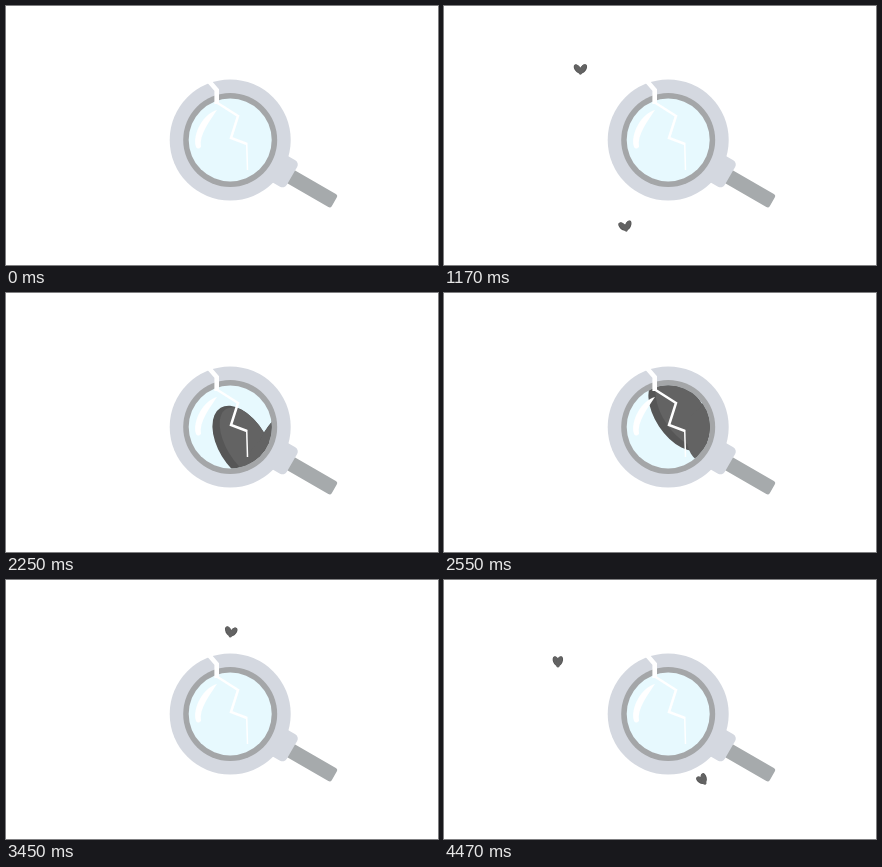
Animation, 432 px wide and 259 px high, one loop 4.5 s. Source, as an HTML page with a canvas:

```html
<!DOCTYPE html>
<html lang="en">
<head>
<meta charset="utf-8">
<title>Magnifier and flies</title>
<style>
html, body { margin: 0; width: 100%; height: 100%; overflow: hidden; background: #fff; }
canvas { display: block; }
</style>
</head>
<body>
<canvas id="stage" width="432" height="259"></canvas>
<script>
const ctx = document.getElementById('stage').getContext('2d');
const LOOP = 4500, STEP = 30;
const LENS = { x: 224.2, y: 134, rim: 60.5, inner: 47, glass: 41.5 };
const ZOOM = 7.8;

// Waypoints: time, x, y
const innerPath = [
  [0, 192, 98], [630, 159.5, 130], [1080, 174, 211], [1400, 206, 226],
  [1740, 235.5, 194], [3240, 246, 74], [3450, 225, 52], [4470, 114, 82]
];
const outerPath = [
  [0, 258, 98], [380, 248, 31], [630, 220.5, 44.5], [1740, 58.5, 86],
  [2450, 36, 140], [2970, 55, 187], [4100, 185, 227], [4470, 258.5, 200]
];

// Cubic interpolation through unevenly timed waypoints
function pointAt(path, t) {
  const last = path.length - 1;
  let i = 0;
  while (i < last - 1 && t > path[i + 1][0]) i++;
  const a = path[i], b = path[i + 1];
  const before = path[Math.max(0, i - 1)], after = path[Math.min(last, i + 2)];
  const span = b[0] - a[0], u = (t - a[0]) / span;
  return [1, 2].map(k => {
    const m0 = (b[k] - before[k]) / (b[0] - before[0]) * span;
    const m1 = (after[k] - a[k]) / (after[0] - a[0]) * span;
    const d = b[k] - a[k];
    return a[k] + u * (m0 + u * (3 * d - 2 * m0 - m1 + u * (m0 + m1 - 2 * d)));
  });
}

function ellipse(x, y, rx, ry, color) {
  ctx.fillStyle = color;
  ctx.beginPath();
  ctx.ellipse(x, y, rx, ry, 0, 0, Math.PI * 2);
  ctx.fill();
}

function drawFly(x, y, scale, lean, spread) {
  ctx.save();
  ctx.translate(x, y);
  ctx.rotate(lean);
  ctx.scale(scale, scale);
  for (const side of [-1, 1]) {
    ctx.save();
    ctx.translate(0, 4);
    ctx.rotate(side * spread);
    ellipse(0, -5.3, 3.1, 5.4, '#565656');
    ellipse(-side * .5, -5.1, 2.6, 5.1, '#636363');
    ctx.restore();
  }
  ellipse(0, 2.4, 2, 3.4, '#636363');
  ctx.restore();
}

// Flies lean more the lower they are and the further to a side
function drawSmallFly(path, t, spread) {
  const [x, y] = pointAt(path, t);
  drawFly(x, y, .95, (y - 90) * (150 - x) / 20000, spread);
}

function line(points, width) {
  ctx.lineWidth = width;
  ctx.beginPath();
  points.forEach(([x, y]) => ctx.lineTo(x, y));
  ctx.stroke();
}

function box(x, y, w, h, r, color) {
  ctx.fillStyle = color;
  ctx.beginPath();
  ctx.roundRect(x, y, w, h, r);
  ctx.fill();
}

function drawMagnifier(t, spread) {
  const { x, y, rim, inner, glass } = LENS;
  ctx.save();
  ctx.translate(x, y);
  ctx.rotate(Math.PI / 6);
  box(66, -6, 55, 15, 2.5, '#a6aaac');
  box(50, -15, 21.5, 30.5, 5, '#d4d8e0');
  ctx.restore();

  ellipse(x, y, rim, rim, '#d4d8e0');
  ellipse(x, y, inner, inner, '#a4a6a8');
  ellipse(x, y, glass, glass, '#e7f9fe');

  // The enlarged fly drifts straight up across the glass
  if (t > 1740) {
    ctx.save();
    ctx.beginPath();
    ctx.arc(x, y, glass, 0, Math.PI * 2);
    ctx.clip();
    drawFly(258, 155 - (t - 2250) * .105, ZOOM, 0, spread);
    ctx.restore();
  }

  ctx.fillStyle = '#fff';
  ctx.beginPath();
  ctx.moveTo(211, 104);
  ctx.bezierCurveTo(198, 107, 186, 128, 190, 141);
  ctx.quadraticCurveTo(192, 144, 195, 141);
  ctx.bezierCurveTo(193, 129, 203, 116, 211, 104);
  ctx.fill();

  ctx.strokeStyle = '#fff';
  line([[202, 74], [210.7, 84], [210.7, 98]], 4.6);
  line([[210, 96], [232, 110], [225, 132], [241, 138]], 2.5);
  line([[240.7, 137], [241.5, 164]], 1.5);
}

function draw(now) {
  const t = now % LOOP;
  const spread = .44 - .18 * Math.cos((t - 630) * Math.PI / 600);
  const flickers = Math.floor(t / STEP) % 5 === 0;
  ctx.fillStyle = '#fff';
  ctx.fillRect(0, 0, 432, 259);
  drawSmallFly(innerPath, t, spread);
  if (!flickers) drawSmallFly(outerPath, t, spread);
  drawMagnifier(t, spread);
}

const start = performance.now();
function tick() {
  draw(performance.now() - start);
  requestAnimationFrame(tick);
}
tick();
</script>
</body>
</html>
```
